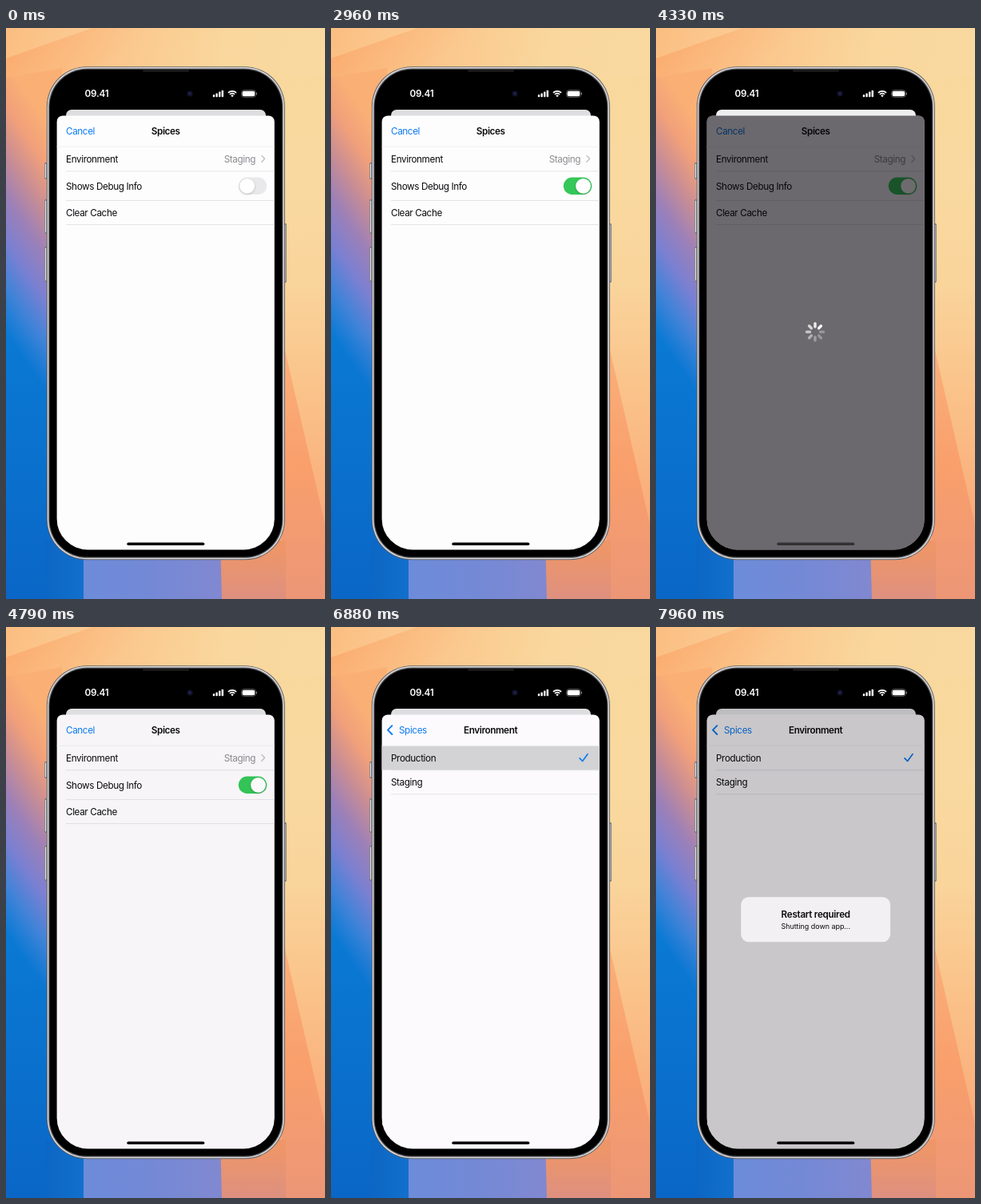
An HTML page with a canvas that plays this animation: 399x713 px, repeating every 8 s.

```html
<!DOCTYPE html>
<html lang="en">
<head>
<meta charset="utf-8">
<title>Spices</title>
<style>
html, body { margin: 0; width: 100%; height: 100%; overflow: hidden; background: #000; }
canvas { display: block; width: 399px; height: 713px; }
</style>
</head>
<body>
<canvas id="stage"></canvas>
<script>
const W = 399, H = 713, LOOP = 8000;
const FONT = 'Inter, "Liberation Sans", sans-serif';
const BLUE = '#0a7bf2', INK = '#0b0b0d', LINE = '#dcdbde';
const canvas = document.getElementById('stage');
const dpr = window.devicePixelRatio || 1;
canvas.width = W * dpr;
canvas.height = H * dpr;
let c = canvas.getContext('2d');

const clamp = x => Math.max(0, Math.min(1, x));
const mix = (a, b, p) => a + (b - a) * p;
const smooth = (t, a, b) => { const x = clamp((t - a) / (b - a)); return x * x * (3 - 2 * x); };
const grey = v => `rgb(${Math.round(v)},${Math.round(v) - 1},${Math.round(v) + 1})`;

function rect(x, y, w, h, r, fill) {
  c.beginPath();
  c.roundRect(x, y, w, h, r);
  if (fill) { c.fillStyle = fill; c.fill(); }
}

function path(points, color, width) {
  c.beginPath();
  points.forEach(([x, y]) => c.lineTo(x, y));
  c.strokeStyle = color;
  c.lineWidth = width;
  c.lineCap = c.lineJoin = 'round';
  c.stroke();
}

function poly(points, fill) {
  c.beginPath();
  points.forEach(([x, y]) => c.lineTo(x, y));
  c.closePath();
  c.fillStyle = fill;
  c.fill();
}

function ramp(x0, y0, x1, y1, ...colors) {
  const g = c.createLinearGradient(x0, y0, x1, y1);
  colors.forEach((color, i) => g.addColorStop(i / (colors.length - 1), color));
  return g;
}

function text(s, x, y, { color = INK, size = 11.7, weight = 400, align = 'left', gap = -0.38 } = {}) {
  c.font = `${weight} ${size}px ${FONT}`;
  c.letterSpacing = gap + 'px';
  c.textAlign = align;
  c.textBaseline = 'alphabetic';
  c.fillStyle = color;
  c.fillText(s, x, y + size * 0.36);
}

function faded(alpha, draw) {
  if (alpha <= 0) return;
  c.save();
  c.globalAlpha *= alpha;
  draw();
  c.restore();
}

function wallpaper() {
  rect(0, 0, W, H, 0, ramp(0, 0, 399, 90, '#fbb87c', '#fbc68c', '#f9d79d', '#f9d9a0'));
  poly([[0, 0], [108, 0], [0, 38]], ramp(0, 0, 90, 30, '#fbbd80', '#fbcb93'));
  poly([[0, 38], [108, 0], [190, 0], [60, 80], [0, 90]],
    ramp(20, 20, 110, 90, '#fbae72', 'rgba(251,190,130,0)'));
  // right side
  poly([[330, 60], [399, 60], [399, 713], [330, 713]],
    ramp(0, 60, 0, 713, '#f9d89d', '#f9d99f', '#f9d49b', '#fac38a', '#fab07c', '#ee9a78'));
  poly([[345, 385], [399, 620], [399, 713], [345, 713]],
    ramp(0, 385, 0, 713, '#fab27c', '#f99f6c', '#ec9676'));
  // left side, blue arriving first at the edge
  poly([[0, 62], [70, 50], [70, 713], [0, 713]],
    ramp(0, 40, -157, 145, '#fab075', '#f1a07a', '#c98d94', '#9c80b8', '#7a80d2', '#3f83d8', '#0a7ad4'));
  rect(0, 380, 97, 333, 0, ramp(0, 380, 0, 713, 'rgba(10,96,194,0)', 'rgba(10,96,194,.75)'));
  // bottom
  rect(50, 640, 48, 73, 0, ramp(50, 0, 98, 0, '#0c66c4', '#1270cc'));
  rect(97, 640, 173, 73, 0, ramp(97, 0, 270, 0, '#6c8cda', '#7489d6', '#8188d0'));
  poly([[268, 640], [350, 640], [350, 713], [270, 713]], ramp(0, 650, 0, 713, '#ee9668', '#de9080'));
}

function button(x, y, h) {
  rect(x, y, 3.4, h, 1.4, '#77777b');
  rect(x + 0.7, y + 1.5, 1.4, h - 3, 0.7, '#d9d9dc');
}

function phone() {
  button(48.2, 168, 21);
  button(48.2, 214, 43);
  button(48.2, 273, 44);
  button(347.4, 244, 74);
  rect(50.9, 48.2, 298, 616, 50, '#5c5c60');
  rect(51.8, 49.1, 296.2, 614.2, 49.2, '#dcdbdd');
  rect(53.3, 50.6, 293.2, 611.2, 47.8, '#5a5a5e');
  rect(54.5, 51.8, 290.8, 608.8, 46.8, '#000');
  rect(171, 52.6, 58, 1.8, 1, '#232325');
  text('09.41', 113.5, 82, { color: '#fff', size: 11.7, weight: 600, align: 'center', gap: -0.2 });
  c.beginPath();
  c.arc(230, 82, 3.6, 0, 7);
  c.fillStyle = '#11112a';
  c.fill();
  c.beginPath();
  c.arc(230, 82, 1.4, 0, 7);
  c.fillStyle = '#26265a';
  c.fill();
  for (let i = 0; i < 4; i++) {
    const h = 3 + i * 1.8;
    rect(258.8 + i * 3.6, 86.2 - h, 2.4, h, 0.7, '#fff');
  }
  c.strokeStyle = '#fff';
  c.lineCap = 'butt';
  for (const r of [7.2, 4.4]) {
    c.beginPath();
    c.arc(283, 86, r, -Math.PI * 0.75, -Math.PI * 0.25);
    c.lineWidth = 1.7;
    c.stroke();
  }
  c.beginPath();
  c.moveTo(283, 86.2);
  c.arc(283, 86.2, 2.5, -Math.PI * 0.75, -Math.PI * 0.25);
  c.fillStyle = '#fff';
  c.fill();
  c.strokeStyle = '#77777a';
  c.lineWidth = 0.8;
  rect(294.6, 77.7, 17.6, 8.6, 2.8);
  c.stroke();
  rect(295.6, 78.7, 15.6, 6.6, 2, '#fff');
  rect(312.9, 80.5, 1, 3, 0.5, '#8a8a8d');
}

const rule = (x, y) => rect(x, y, 436 - x, 0.8, 0, LINE);
const check = (x, y) => path([[x, y + 0.6], [x + 3.6, y + 4.2], [x + 10, y - 4.6]], BLUE, 1.7);

function toggle(on) {
  const ch = (a, b) => Math.round(mix(a, b, on));
  rect(290.8, 186.6, 35.4, 21.4, 10.7, `rgb(${ch(233, 52)},${ch(233, 199)},${ch(235, 89)})`);
  c.save();
  c.shadowColor = 'rgba(0,0,0,.2)';
  c.shadowBlur = 3 * dpr;
  c.shadowOffsetY = dpr;
  c.beginPath();
  c.arc(mix(301.6, 315.5, on), 197.3, 9.4, 0, 7);
  c.fillStyle = '#fff';
  c.fill();
  c.restore();
}

function mainPage(t, paper) {
  rect(63, 148, 273, 504, 0, paper);
  const env = t >= 5670 ? 1 : 0;
  const clear = t >= 3960 ? 1 - smooth(t, 4000, 4280) : 0;
  faded(env, () => rect(63, 148.4, 273, 30.4, 0, '#cbcacd'));
  faded(clear, () => rect(63, 215.4, 273, 30.4, 0, '#d3d2d5'));
  text('Environment', 75, 163.3);
  text('Staging', 312, 163.3, { color: '#8b8a8e', align: 'right' });
  path([[319.8, 159.4], [323.6, 163.3], [319.8, 167.2]], '#bdbcc0', 1.3);
  text('Shows Debug Info', 75, 197.3);
  toggle(smooth(t, 2640, 2800));
  text('Clear Cache', 75, 231);
  [178.4, 215.2, 245.3].forEach(y => rule(75, y));
}

function envPage(t, paper) {
  rect(64, 148, 272, 504, 0, paper);
  const press = t >= 6830 ? 1 - smooth(t, 6880, 7160) : 0;
  faded(press, () => rect(63, 148.4, 273, 30.2, 0, '#d3d2d5'));
  text('Production', 75, 163.3);
  text('Staging', 75, 194.2);
  check(311, t >= 6850 ? 163.3 : 194.2);
  rule(75, 178.4);
  rule(75, 208.4);
}

function nav(p, paper) {
  rect(63, 109, 273, 39, 0, paper);
  rect(63, 147.8, 273, 0.6, 0, '#ececee');
  faded(clamp(1 - p * 2), () => text('Cancel', 75, 128.6, { color: BLUE }));
  faded(1 - p, () => text('Spices', mix(199.7, 103, p), 128.6, { weight: 600, align: 'center' }));
  faded(p, () => {
    path([[76.4, 123.2], [71, 128.6], [76.4, 134]], BLUE, 1.9);
    text('Spices', mix(150, 85, p), 128.6, { color: BLUE });
    text('Environment', mix(305, 199.6, p), 128.6, { weight: 600, align: 'center' });
  });
}

// Critically damped spring for the push
function pushed(t) {
  const x = Math.max(0, t - 5700) * 0.02;
  return t > 6290 ? 1 : 1 - (1 + x) * Math.exp(-x);
}

const busy = e => smooth(e, 60, 330) * (1 - smooth(e, 545, 865));

function spinner(e) {
  const head = Math.floor((e - 250) / 83) + 16;
  for (let i = 0; i < 8; i++) {
    const lag = (head - i) % 8;
    c.save();
    c.translate(199, 379.5);
    c.rotate(i * Math.PI / 4);
    c.globalAlpha *= Math.max(0.3, 1 - lag * 0.13);
    rect(-1.75, -12.2, 3.5, 7.4, 1.75, '#fff');
    c.restore();
  }
}

function alertBox(p) {
  faded(p, () => {
    const s = mix(1.16, 1, p);
    c.translate(199.7, 365);
    c.scale(s, s);
    c.translate(-199.7, -365);
    rect(106.3, 337.2, 186.8, 56, 9.6, '#f2f0f3');
    text('Restart required', 199.7, 358.3, { weight: 600, align: 'center', gap: -0.3 });
    text('Shutting down app...', 199.7, 373.4, { size: 9, align: 'center', gap: -0.06 });
  });
}

function sheet(t) {
  const p = pushed(t);
  const e = t < 6000 ? t - 3960 : t - 6830;
  const dim = busy(e), warn = smooth(t, 7650, 7960);
  const paper = t < 4300 ? '#fefdfe' : '#fcfafd';

  rect(75, 102, 250, 16, [7, 7, 0, 0], grey(mix(mix(222, 238, dim), 190, warn)));
  c.save();
  rect(63.6, 109.4, 272.2, 542, [7.5, 7.5, 38.5, 38.5]);
  c.clip();
  if (p < 1) {
    c.save();
    c.translate(-81 * p, 0);
    mainPage(t, paper);
    c.restore();
    faded(p * 0.06, () => rect(63, 148, 273, 504, 0, '#000'));
  }
  if (p > 0) {
    c.save();
    c.translate(272 * (1 - p), 0);
    if (p === 1) rect(63, 148, 2, 504, 0, paper);
    envPage(t, paper);
    c.restore();
  }
  nav(p, paper);
  faded(dim * 0.585, () => rect(63, 109, 273, 543, 0, '#060307'));
  faded(warn * 0.205, () => rect(63, 109, 273, 543, 0, '#000'));
  rect(151.3, 642.6, 97, 3.4, 1.7, grey(mix(2, 50, dim)));
  faded(dim, () => spinner(e));
  alertBox(warn);
  c.restore();
}

// The wallpaper and phone never move, so paint them once
const still = document.createElement('canvas');
still.width = canvas.width;
still.height = canvas.height;
const view = c;
c = still.getContext('2d');
c.scale(dpr, dpr);
wallpaper();
phone();
c = view;

const start = performance.now();
function frame(now) {
  const t = Math.max(0, now - start) % LOOP;
  c.setTransform(1, 0, 0, 1, 0, 0);
  c.drawImage(still, 0, 0);
  c.scale(dpr, dpr);
  sheet(t);
  requestAnimationFrame(frame);
}
frame(start);
</script>
</body>
</html>
```
